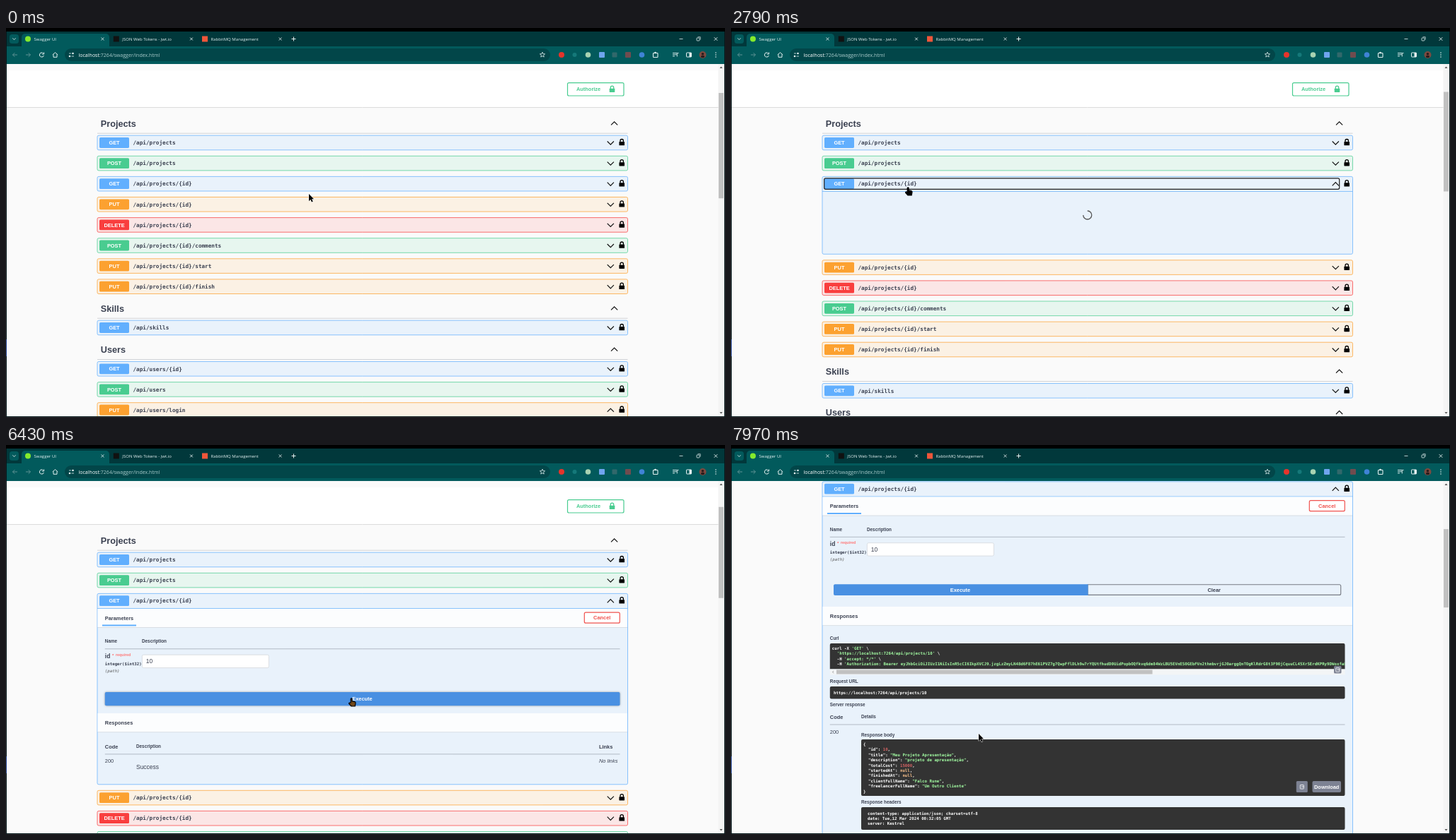
These frames come from a looping animation (1016 by 551 pixels, 8 s). An HTML page with a canvas:

```html
<!DOCTYPE html>
<html lang="en">
<head>
<meta charset="utf-8">
<title>API explorer</title>
<style>
html, body { margin: 0; width: 1016px; height: 551px; overflow: hidden; background: #06181b; }
canvas { display: block; width: 1016px; height: 551px; }
</style>
</head>
<body>
<canvas id="stage"></canvas>
<script>
const LOOP = 8000, W = 1016, H = 551;
const canvas = document.getElementById('stage');
const ratio = window.devicePixelRatio || 1;
canvas.width = W * ratio;
canvas.height = H * ratio;
const c = canvas.getContext('2d');

const SANS = '"Liberation Sans", Arial, sans-serif';
const MONO = '"DejaVu Sans Mono", monospace';
const UI = '"Open Sans", sans-serif';
const INK = '#3b4151';
const METHOD = { GET: '#61affe', POST: '#49cc90', PUT: '#fca130', DELETE: '#f93e3e' };

// Drawing helpers
function box(x, y, w, h, fill, r = 0, stroke, lw = 1) {
  c.beginPath();
  c.roundRect(x, y, w, h, r);
  if (fill) { c.fillStyle = fill; c.fill(); }
  if (stroke) { c.strokeStyle = stroke; c.lineWidth = lw; c.stroke(); }
}

function line(points, color, lw = 1) {
  c.beginPath();
  points.forEach(([x, y], i) => i ? c.lineTo(x, y) : c.moveTo(x, y));
  c.strokeStyle = color;
  c.lineWidth = lw;
  c.stroke();
}

function disc(x, y, r, color) {
  c.beginPath();
  c.arc(x, y, r, 0, 7);
  c.fillStyle = color;
  c.fill();
}

// y is the middle of the capital letters
function text(s, x, y, size, { color = INK, style = '', family = SANS, align = 'left' } = {}) {
  c.font = `${style} ${size}px ${family}`;
  c.textAlign = align;
  c.fillStyle = color;
  c.fillText(s, x, y + size * 0.36);
  return c.measureText(s).width;
}
const bold = (s, x, y, size = 7.41, color = INK, align = 'left') =>
  text(s, x, y, size, { color, align, style: 'bold' });
const small = (s, x, y) => bold(s, x, y, 6.35);

function chevron(x, y, up, color = '#111', w = 4.6, h = 2.3, lw = 1.2) {
  const d = up ? -h : h;
  line([[x - w, y - d], [x, y + d], [x + w, y - d]], color, lw);
}

function cross(x, y, r, color) {
  line([[x - r, y - r], [x + r, y + r]], color, 0.9);
  line([[x + r, y - r], [x - r, y + r]], color, 0.9);
}

function lock(x, y, color) {
  box(x - 3.8, y - 0.6, 7.6, 5.2, color, 0.6);
  c.beginPath();
  c.arc(x, y - 2, 2.2, Math.PI, 0);
  c.lineTo(x + 2.2, y);
  c.moveTo(x - 2.2, y - 2);
  c.lineTo(x - 2.2, y);
  c.strokeStyle = color;
  c.lineWidth = 1.3;
  c.stroke();
}

function code(lines, x, y) {
  lines.forEach((s, i) => {
    let px = x;
    s.split(/('.*'|(?<=: )(?:"[^"]*"|\d+|null))/).forEach((part, k) => {
      const color = k % 2 === 0 ? '#fff' : /^['"]/.test(part) ? '#a2fca2' : /^\d/.test(part) ? '#d36363' : '#fcc28c';
      px += text(part, px, y + i * 7.4, 5.76, { color, style: 'bold', family: MONO });
    });
  });
}

function clipped(x, y, w, h, draw) {
  c.save();
  c.beginPath();
  c.rect(x, y, w, h);
  c.clip();
  draw();
  c.restore();
}

// Timing helpers
const clamp01 = v => Math.min(1, Math.max(0, v));
const smooth = u => u * u * (3 - 2 * u);
const between = (t, a, b) => t >= a && t < b;

function scrollAt(t) {
  return 158.5 * smooth(clamp01((t - 6995) / 375));
}

function stateAt(t) {
  const s = { open: -1, phase: 'full', ring: -1, tryIt: t >= 3610, done: t >= 6500, extra: 0 };
  if (between(t, 1720, 2330)) s.open = 3;
  if (t >= 2790) s.open = 2;
  if (between(t, 1720, 1860) || between(t, 2790, 2860)) s.phase = 'load';
  if (between(t, 1380, 2650)) s.ring = 3;
  if (between(t, 2650, 3540)) s.ring = 2;
  if (s.open >= 0) {
    s.extra = s.phase === 'load' ? 89.3 : s.open === 3 ? 365.4 : s.done ? 551 : s.tryIt ? 249.8 : 230.4;
  }
  return s;
}

// Pointer: time, left, top, shape
const POINTER = [
  [0, 428, 235, 'arrow'], [250, 428, 235, 'arrow'], [330, 405, 240, 'hand'], [600, 300, 248, 'hand'],
  [780, 223, 251, 'hand'], [900, 250, 254, 'hand'], [2400, 250, 254, 'hand'], [2630, 246, 225, 'hand'],
  [3070, 246, 225, 'hand'], [3200, 450, 214, 'hand'], [3470, 838, 243, 'hand'], [3880, 838, 243, 'arrow'],
  [4020, 560, 490, 'arrow'], [4190, 290, 400, 'arrow'], [4270, 245, 312, 'beam'], [4340, 224, 296, 'beam'],
  [4539, 224, 296, 'beam'], [4540, 223, 296, 'beam'], [5810, 223, 296, 'arrow'], [6100, 390, 345, 'arrow'],
  [6260, 470, 357, 'hand'], [6360, 484, 358, 'hand'], [6640, 484, 358, 'hand'], [6970, 391, 353, 'hand'],
  [7100, 391, 353, 'arrow'], [7370, 400, 328, 'arrow'], [7500, 400, 328, 'arrow'], [7640, 330, 440, 'arrow'],
  [7760, 244, 508, 'arrow'], [7860, 290, 460, 'arrow'], [7960, 350, 409, 'arrow']
];

function drawPointer(t) {
  let i = POINTER.length - 1;
  while (POINTER[i][0] > t) i--;
  const a = POINTER[i], b = POINTER[i + 1] || a;
  const u = b === a ? 0 : (t - a[0]) / (b[0] - a[0]);
  c.save();
  c.translate(a[1] + (b[1] - a[1]) * u, a[2] + (b[2] - a[2]) * u);
  c.lineJoin = 'round';
  if (a[3] === 'beam') {
    line([[0.5, 0.5], [4, 0.5]], '#222', 0.8);
    line([[2.2, 0.5], [2.2, 9.5]], '#222', 0.8);
    line([[0.5, 9.5], [4, 9.5]], '#222', 0.8);
  } else if (a[3] === 'arrow') {
    const shape = new Path2D('M0 0V10.2L2.3 8L4 11.6L5.7 10.8L4.1 7.3H7Z');
    c.strokeStyle = '#fff';
    c.lineWidth = 1;
    c.stroke(shape);
    c.fillStyle = '#000';
    c.fill(shape);
  } else {
    const shape = new Path2D('M3.2 7V1.4Q4.2 .2 5 1.4V4.8L9 5.7Q10 6 10 7.3L9.2 12H4L.6 8.3Q.6 6.6 2 7.2Z');
    c.fillStyle = t < 5810 ? '#000' : t < 6600 ? '#70471a' : '#c9933c';
    c.fill(shape);
    c.strokeStyle = '#000';
    c.lineWidth = 1.2;
    c.stroke(shape);
  }
  c.restore();
}

// Browser frame
function tab(x, title, color, round) {
  if (round) disc(x + 4, 15.5, 4, color);
  else box(x, 11.5, 8, 8, color);
  text(title, x + 12.5, 15.6, 6.04, { color: '#e6f1f1', family: UI });
}

function drawBrowser() {
  const white = '#e4f0f0', dim = '#5f9294';
  box(0, 0, W, H, '#06181b');
  box(0, 0, W, 5, '#000');
  box(1, 5, 1014, 21, '#01383b');
  box(22, 8, 124, 20, '#025a5c', [5, 5, 0, 0]);
  box(1, 26, 1014, 25, '#025a5c');
  box(5, 9, 13, 13, '#025a5c', 3.5);
  chevron(11.5, 15.5, false, white, 2.2, 1.1, 0.9);
  tab(27, 'Swagger UI', '#85ea2d', true);
  tab(151.8, 'JSON Web Tokens - jwt.io', '#111');
  tab(277, 'RabbitMQ Management', '#f0563a');
  [136.5, 262, 387.5].forEach(x => cross(x, 15.5, 1.9, white));
  line([[403.5, 15.5], [409.5, 15.5]], white);
  line([[406.5, 12.5], [406.5, 18.5]], white);
  line([[951.5, 15.5], [956.5, 15.5]], white, 0.8);
  box(976, 14, 4, 4, null, 0.8, white, 0.8);
  line([[977.5, 12.7], [981.2, 12.7], [981.2, 16.5]], white, 0.7);
  cross(1003, 15.5, 2.3, white);

  line([[16, 38], [9.5, 38]], dim); line([[12.3, 35.2], [9.5, 38], [12.3, 40.8]], dim);
  line([[28, 38], [34.5, 38]], dim); line([[31.7, 35.2], [34.5, 38], [31.7, 40.8]], dim);
  c.beginPath();
  c.arc(50.5, 38, 3.1, 0.3, 5.4);
  c.strokeStyle = white;
  c.stroke();
  line([[53.6, 34.5], [53.6, 37], [51, 37]], white);
  line([[65.8, 38], [69.5, 34.7], [73.2, 38]], white);
  line([[67, 37.5], [67, 41.3], [72, 41.3], [72, 37.5]], white);

  box(83, 29, 686, 18, '#024649', 9);
  line([[89, 36], [92, 36]], white, 0.8); disc(94.5, 36, 1.3, white);
  line([[92.5, 40], [96, 40]], white, 0.8); disc(90, 40, 1.3, white);
  const w = text('localhost', 102.5, 38, 7.04, { color: '#fff', family: UI });
  text(':7264/swagger/index.html', 102.5 + w, 38, 7.04, { color: '#abcccc', family: UI });
  const star = Array.from({ length: 11 }, (_, i) => {
    const a = i * Math.PI / 5 - Math.PI / 2, r = i % 2 ? 1.7 : 3.8;
    return [758 + r * Math.cos(a), 38 + r * Math.sin(a)];
  });
  line(star, white, 0.8);

  disc(785, 38, 4, '#e5342b');
  disc(803.5, 38, 3, '#15797a');
  disc(822.5, 38, 3.8, '#a9d3b2');
  box(838, 34, 8, 8, '#6fa4ee', 1);
  box(856.5, 34.5, 7, 7, '#32686b', 1);
  box(875, 34, 8, 8, '#704c4f', 1);
  disc(898.5, 38, 3.8, '#3f83d6');
  box(914.5, 35.5, 6.5, 6, null, 0.8, white, 1.1);
  disc(917.5, 35, 1.3, white);
  [35.5, 37.7, 39.9].forEach((y, i) => line([[942, y], [i < 2 ? 948 : 945, y]], white, 0.9));
  line([[948.3, 40.5], [948.3, 35.5], [950.5, 35.5]], white, 0.9);
  box(961.5, 35, 7, 6, null, 0.6, white);
  box(965.5, 35, 3, 6, white);
  disc(984.5, 38, 5, '#7c4a40');
  disc(984.5, 36.8, 1.8, '#2a1c1c');
  box(982, 39, 5, 3, '#2a1c1c', 1.4);
  [35, 38, 41].forEach(y => disc(1003, y, 0.8, white));
}

// Page content
const jwt = (() => {
  const set = 'ABCDEFGHIJKLMNOPQRSTUVWXYZabcdefghijklmnopqrstuvwxyz0123456789';
  let seed = 7, out = 'eyJhbGciOiJIUzI1NiIsInR5cCI6IkpXVCJ9.';
  for (let i = 0; i < 160; i++) {
    seed = seed * 16807 % 2147483647;
    out += set[seed % set.length];
  }
  return out;
})();

const CURL = ["curl -X 'GET' \\", "  'https://localhost:7264/api/projects/10' \\",
  "  -H 'accept: */*' \\", `  -H 'Authorization: Bearer ${jwt}'`];
const REPLY = ['{', '  "id": 10,', '  "title": "Meu Projeto Apresentação",',
  '  "description": "projeto de apresentação",', '  "totalCost": 15000,', '  "startedAt": null,',
  '  "finishedAt": null,', '  "clientFullName": "Falco Rune",',
  '  "freelancerFullName": "Um Outro Cliente"', '}'];
const HEADERS = ['content-type: application/json; charset=utf-8', 'date: Tue,12 Mar 2024 00:32:05 GMT', 'server: Kestrel'];
const SAMPLE = ['{', '  "id": 0,', '  "title": "string",', '  "description": "string",', '  "totalCost": 0', '}'];

const GROUPS = [
  ['Projects', ['GET /api/projects', 'POST /api/projects', 'GET /api/projects/{id}', 'PUT /api/projects/{id}',
    'DELETE /api/projects/{id}', 'POST /api/projects/{id}/comments', 'PUT /api/projects/{id}/start',
    'PUT /api/projects/{id}/finish']],
  ['Skills', ['GET /api/skills']],
  ['Users', ['GET /api/users/{id}', 'POST /api/users', 'PUT /api/users/login']]
];

function band(y, title) {
  box(129.5, y, 748.5, 26.4, 'rgba(255,255,255,.85)');
  line([[129.5, y + 26.6], [878, y + 26.6]], 'rgba(0,0,0,.12)', 0.8);
  bold(title, 139.8, y + 13);
}

const rule = y => line([[139.8, y], [867.5, y]], 'rgba(59,65,81,.4)', 0.8);

function copyButton(x, y, size) {
  box(x, y, size, size, '#7d8293', 1.5);
  const k = size / 2;
  box(x + k - 2.5, y + k - 2.5, 5, 5.5, null, 0.5, '#fff', 0.8);
  line([[x + k - 1, y + k], [x + k + 3, y + k]], '#fff', 0.8);
}

function drawParameters(y, s, t) {
  band(y + 11.2, 'Parameters');
  box(136, y + 33.8, 48, 2, METHOD[s.open === 3 ? 'PUT' : 'GET']);
  if (s.tryIt) {
    const u = clamp01((t - 3690) / 250), mix = (a, b) => Math.round(a + (b - a) * u);
    const color = `rgb(${mix(45, 240)},${mix(45, 82)},${mix(50, 78)})`;
    box(817.3, y + 16.5, 50, 15, '#fff', 2, color, 1.2);
    bold('Cancel', 842.2, y + 24, 7.41, color, 'center');
  } else {
    box(810, y + 16.5, 57.3, 15, '#fff', 2, '#888', 1.2);
    bold('Try it out', 838.7, y + 24, 7.41, INK, 'center');
  }
  small('Name', 139.8, y + 57.5);
  small('Description', 192, y + 57.5);
  rule(y + 68.1);
  bold('id', 139.8, y + 78, 8.47);
  bold('*', 150, y + 77, 6, '#f66');
  bold('required', 155, y + 76, 5.29, '#f77');
  text('integer($int32)', 139.8, y + 89.5, 5.76, { style: 'bold', family: MONO });
  text('(path)', 139.8, y + 99.5, 5.76, { style: 'italic', family: MONO, color: '#555' });

  const focused = between(t, 4280, 6400);
  box(192.4, y + 76.5, 179, 18.4, s.tryIt ? '#fff' : '#fafafa', 2, focused ? '#222' : '#d5d8dc', focused ? 1.1 : 0.8);
  const typed = t < 5150 || s.open === 3 ? '' : t < 5350 ? '1' : '10';
  const w = text(typed || 'id', 197.8, y + 85.7, 8.47, { color: typed ? INK : '#7b7b7b' });
  const caret = between(t, 4280, 4810) || between(t, 5150, 5880);
  if (caret) box(198 + (typed ? w : 0), y + 80.3, 0.8, 10, '#111');
}

function drawResult(y) {
  bold('Code', 139.8, y + 47);
  small('Description', 184, y + 47);
  bold('Links', 838, y + 47);
  rule(y + 57.8);
  text('200', 139.8, y + 67.6, 7.41);
  text('Success', 184, y + 76, 8.47);
  text('No links', 838, y + 67.6, 7.41, { style: 'italic' });
}

function drawReply(y) {
  small('Curl', 139.8, y + 45);
  box(139.8, y + 52, 727.7, 36.5, '#333', [2, 2, 0, 0]);
  clipped(139.8, y + 52, 727.7, 36.5, () => code(CURL, 142.8, y + 59));
  box(139.8, y + 88.5, 727.7, 8, '#f3f5f6');
  box(149, y + 89.6, 446.5, 6, '#c1c1c1');
  line([[145, y + 91], [143.5, y + 92.6], [145, y + 94.2]], '#888', 0.8);
  copyButton(852, y + 84, 10.5);
  small('Request URL', 139.8, y + 106);
  box(139.8, y + 113, 727.7, 17.5, '#333', 2);
  code(['https://localhost:7264/api/projects/10'], 145, y + 121.5);
  small('Server response', 139.8, y + 139.2);
  bold('Code', 139.8, y + 156.2);
  small('Details', 184, y + 156.2);
  rule(y + 167);
  text('200', 139.8, y + 177, 7.41);
  small('Response body', 184, y + 181.5);
  box(184, y + 188, 683.5, 80, '#333', 2);
  code(REPLY, 187, y + 195);
  copyButton(798.8, y + 247, 16);
  box(821.5, y + 247, 40.5, 16, '#7d8293', 2);
  bold('Download', 841.7, y + 255, 7.41, '#fff', 'center');
  small('Response headers', 184, y + 277);
  box(184, y + 284, 683.5, 32, '#333', 2);
  code(HEADERS, 193, y + 292.5);
}

function drawBody(y) {
  band(y + 118.7, 'Request body');
  box(787, y + 124, 80.5, 16, '#f7f7f7', 2, INK, 1);
  bold('application/json', 792, y + 132, 6.9);
  chevron(861, y + 132, false, '#222', 2, 1);
  text('Example Value', 139.8, y + 161, 6.35, { style: 'bold' });
  text('Schema', 192, y + 161, 6.35);
  line([[187.5, y + 157], [187.5, y + 165]], '#999', 0.6);
  box(139.8, y + 171, 727.7, 57, '#333', 2);
  code(SAMPLE, 145, y + 181);
}

function drawPanel(y, s, t) {
  if (s.phase === 'load') {
    c.beginPath();
    c.arc(503.7, y + 44.3, 6, -Math.PI / 2, Math.PI);
    c.strokeStyle = '#555';
    c.lineWidth = 1.3;
    c.stroke();
    return;
  }
  drawParameters(y, s, t);
  let top = 140;
  if (s.open === 3) {
    drawBody(y);
    top = 275;
  } else if (s.done) {
    top = 166.8;
    box(504, y + 135.6, 357.7, 14.6, null, [0, 2, 2, 0], '#777b84', 1.1);
    box(145, y + 135, 359.5, 15.7, '#4990e2', [2, 0, 0, 2]);
    bold('Execute', 324, y + 143, 7.41, '#fff', 'center');
    bold('Clear', 682.7, y + 143, 7.41, INK, 'center');
  } else if (s.tryIt) {
    top = 159.4;
    c.save();
    if (t > 6260) { c.shadowColor = 'rgba(0,0,0,.35)'; c.shadowBlur = 3 * ratio; }
    box(139.8, y + 129.4, 727.7, 19.2, '#4990e2', 2);
    c.restore();
    bold('Execute', 503.5, y + 139, 7.41, '#fff', 'center');
  }
  band(y + top, 'Responses');
  if (s.done) drawReply(y + top);
  else drawResult(y + top);
}

function drawRow(entry, y, extra, open, ring) {
  const [method, path] = entry.split(' '), color = METHOD[method];
  box(129, y - 10.3, 749.5, 20.6 + extra, color + '1c', 2, color + 'd0', 0.9);
  if (open) line([[129, y + 10.8], [878.5, y + 10.8]], color, 0.7);
  box(132, y - 7.4, 42, 14.8, color, 1.6);
  bold(method, 153, y, 7.41, '#fff', 'center');
  text(path, 179.5, y, 7.68, { style: 'bold', family: MONO });
  chevron(854.3, y + 0.3, open);
  lock(870.2, y - 0.8, '#000');
  if (ring) box(131.7, y - 7.8, 728, 15.4, null, 2, '#1c1c1c', 1.2);
}

function drawPage(s, t) {
  box(0, 60, 1007, 52.5, '#fff');
  line([[0, 112.6], [1007, 112.6]], '#dadada', 1);
  box(793.5, 77.6, 79.5, 18.4, '#fff', 2, METHOD.POST, 1.2);
  bold('Authorize', 806, 86.6, 7.41, METHOD.POST);
  lock(856.5, 86.3, METHOD.POST);

  let y = 135.3;
  GROUPS.forEach(([title, entries], g) => {
    bold(title, 133.8, y, 12.7);
    chevron(859.6, y - 0.2, true);
    line([[129, y + 13.9], [878.5, y + 13.9]], 'rgba(59,65,81,.3)', 0.7);
    y += 27.2;
    entries.forEach((entry, i) => {
      const open = g === 0 && i === s.open, login = entry.endsWith('login');
      const extra = open ? s.extra : 0;
      drawRow(entry, y, login ? 600 : extra, open || login, g === 0 && i === s.ring);
      if (open) drawPanel(y, s, t);
      y += 29.1 + extra;
    });
    y += 2;
  });
}

function drawScrollbar(extra, scroll) {
  const total = 1607 + extra, track = 480;
  box(1006.5, 51, 8.5, 499, '#f4f4f4');
  box(1007, 60 + (107.5 + scroll) * track / total, 7, 499 * track / total, '#c1c1c1');
  c.fillStyle = '#555';
  c.fill(new Path2D('M1008.5 57L1010.5 54.5L1012.5 57Z M1008.5 544L1010.5 546.5L1012.5 544Z'));
}

function render(now) {
  const t = now % LOOP, s = stateAt(t), scroll = scrollAt(t);
  c.setTransform(ratio, 0, 0, ratio, 0, 0);
  drawBrowser();
  clipped(1, 51, 1014, 499, () => {
    box(0, 50, W, 501, '#fafafa');
    c.save();
    c.translate(0, -scroll);
    drawPage(s, t);
    c.restore();
    drawScrollbar(s.extra, scroll);
  });
  box(0, 441, 1, 24, '#1d3f8f');
  drawPointer(t);
}

let start;
function frame(now) {
  start ??= now;
  render(now - start);
  requestAnimationFrame(frame);
}
requestAnimationFrame(frame);
</script>
</body>
</html>
```
